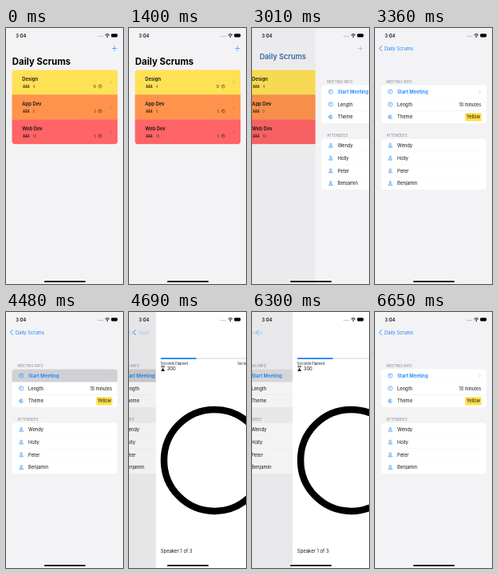
An HTML page with a canvas that plays this animation: 147 by 320 pixels, repeating every 6720 ms.

```html
<!DOCTYPE html>
<html lang="en">
<head>
<meta charset="utf-8">
<title>Daily Scrums</title>
<style>
html, body { margin: 0; width: 100%; height: 100%; overflow: hidden; background: #f3f3f6; }
canvas { display: block; width: 100vw; height: 100vh; }
</style>
</head>
<body>
<canvas id="stage"></canvas>
<script>
const W = 147, H = 320, LOOP = 6720, STEP = 70;
const BLUE = '#1483fa', BACKDROP = '#f3f3f6', INK = '#000', BODY = '#161616';
const canvas = document.getElementById('stage');
const ctx = canvas.getContext('2d');

const clamp = v => Math.max(0, Math.min(1, v));
const mix = (a, b, p) => a + (b - a) * p;

// Critically damped navigation spring, 0 to 1.
function spring(ms) {
  const x = 18 * Math.max(0, ms) / 1000;
  const p = 1 - (1 + x) * Math.exp(-x);
  return p > 0.995 ? 1 : p;
}

function layer(alpha, dx, draw) {
  if (alpha <= 0) return;
  ctx.save();
  ctx.globalAlpha *= alpha;
  ctx.translate(dx, 0);
  draw();
  ctx.restore();
}

function rect(x, y, w, h, color, r = 0) {
  ctx.fillStyle = color;
  ctx.beginPath();
  ctx.roundRect(x, y, w, h, r);
  ctx.fill();
}

function text(str, x, y, size, color = BODY, weight = 400, align = 'left') {
  ctx.font = `${weight} ${size}px Inter, "Open Sans", sans-serif`;
  ctx.textAlign = align;
  ctx.fillStyle = color;
  ctx.fillText(str, x, y);
}

function line(points, color, width) {
  ctx.strokeStyle = color;
  ctx.lineWidth = width;
  ctx.lineCap = ctx.lineJoin = 'round';
  ctx.beginPath();
  points.forEach(([x, y]) => ctx.lineTo(x, y));
  ctx.stroke();
}

function ring(x, y, r, color, width, from = 0, to = Math.PI * 2) {
  ctx.strokeStyle = color;
  ctx.lineWidth = width;
  ctx.lineCap = 'butt';
  ctx.beginPath();
  ctx.arc(x, y, r, from, to);
  ctx.stroke();
}

function shape(points, color) {
  ctx.fillStyle = color;
  ctx.beginPath();
  points.forEach(([x, y]) => ctx.lineTo(x, y));
  ctx.fill();
}

function dot(x, y, r, color) {
  ctx.fillStyle = color;
  ctx.beginPath();
  ctx.arc(x, y, r, 0, Math.PI * 2);
  ctx.fill();
}

const disclosure = (y, color) => line([[130.8, y - 1.9], [132.6, y], [130.8, y + 1.9]], color, 0.6);

function clock(x, y, r, color) {
  ring(x, y, r, color, 0.6);
  line([[x, y - r * 0.65], [x, y], [x - r * 0.5, y]], color, 0.5);
}

function person(x, y) {
  ring(x, y - 1.4, 1.2, BLUE, 0.6);
  ring(x, y + 2.4, 2.1, BLUE, 0.6, Math.PI, 0);
  line([[x - 2.1, y + 2.4], [x + 2.1, y + 2.4]], BLUE, 0.6);
}

function crowd(x, y, color) {
  for (const dx of [-2.8, 0, 2.8]) {
    dot(x + dx, y - 1.1, 0.95, color);
    rect(x + dx - 1.5, y + 0.2, 3, 1.5, color, [1.2, 1.2, 0, 0]);
  }
}

function palette(x, y) {
  ring(x, y, 2.3, BLUE, 0.7, 0.4, 5.6);
  line([[x - 2, y - 0.4], [x + 0.8, y - 0.6], [x + 2, y + 0.9]], BLUE, 0.7);
  dot(x - 0.3, y + 0.9, 0.6, BLUE);
}

function hourglass(x, y, sandLow) {
  const top = y - 2.8, end = y + 2.8;
  rect(x - 2.2, top - 0.3, 4.4, 0.8, INK);
  rect(x - 2.2, end - 0.5, 4.4, 0.8, INK);
  for (const side of [-1, 1]) {
    line([[x + 1.5 * side, top], [x + 1.3 * side, y - 1.2], [x, y],
      [x + 1.3 * side, y + 1.2], [x + 1.5 * side, end]], INK, 0.5);
  }
  const edge = sandLow ? end : top;
  shape([[x - 1.6, edge], [x, y], [x + 1.6, edge]], INK);
}

const scrums = [
  ['Design', '4', '10', '#ffe156'],
  ['App Dev', '5', '5', '#ff934c'],
  ['Web Dev', '10', '5', '#ff6466'],
];

function listPage() {
  const top = 52.3, row = 31, soft = 'rgba(0,0,0,.66)';
  rect(0, 0, W, H, BACKDROP);
  ctx.save();
  ctx.beginPath();
  ctx.roundRect(7.5, top, 132.7, row * 3, 4);
  ctx.clip();
  scrums.forEach(([name, people, minutes, color], i) => {
    const y = top + row * i;
    rect(7, y, 134, row + 0.2, color);
    text(name, 20.3, y + 13.5, 5.9, BODY, 600);
    crowd(25.4, y + 20.6, soft);
    text(people, 33.7, y + 22.2, 4.2, soft);
    text(minutes, 113.5, y + 22.2, 4.2, soft, 400, 'right');
    clock(118.4, y + 20.6, 2, soft);
    disclosure(y + 15.5, 'rgba(60,60,67,.36)');
  });
  ctx.restore();
}

const attendees = ['Wendy', 'Holly', 'Peter', 'Benjamin'];

function detailPage(highlight) {
  const row = 15.8, label = '#8a8a8f', rule = '#ececee';
  rect(0, 0, W, H, BACKDROP);

  text('MEETING INFO', 14.5, 68.8, 4.5, label);
  rect(7.5, 71.6, 132.5, row * 3, '#fff', 3.6);
  for (const i of [1, 2]) rect(28, 71.5 + row * i, 112, 0.3, rule);
  layer(highlight, 0, () => rect(7.5, 71.6, 132.5, row, '#d1d1d5', [3.6, 3.6, 0, 0]));
  clock(19.2, 79.6, 2.6, BLUE);
  text('Start Meeting', 28, 81.8, 5.9, BLUE, 600);
  disclosure(79.6, '#b9b9be');
  clock(19.2, 95.4, 2.6, BLUE);
  text('Length', 28, 97.6, 5.8);
  text('10 minutes', 133.2, 97.6, 5.5, BODY, 400, 'right');
  palette(19.2, 111.2);
  text('Theme', 28, 113.4, 5.8);
  rect(113.4, 106.3, 20.2, 10.2, '#ffdf4d', 1.2);
  text('Yellow', 123.5, 113.4, 5.6, BODY, 400, 'center');

  text('ATTENDEES', 14.5, 135.6, 4.5, label);
  rect(7.5, 138.7, 132.5, row * 4, '#fff', 3.6);
  attendees.forEach((name, i) => {
    const y = 146.8 + row * i;
    if (i) rect(28, 138.6 + row * i, 112, 0.3, rule);
    person(19.2, y);
    text(name, 28, y + 2.2, 5.8);
  });
}

function meetingPage() {
  rect(0, 0, W, H, '#fff');
  rect(6, 57.3, 135, 1.6, '#e5e5ea', 0.8);
  rect(6, 57.3, 45, 1.6, BLUE, 0.8);
  text('Seconds Elapsed', 6, 65.8, 4.2);
  text('Seconds Remaining', 141.5, 65.8, 4.2, BODY, 400, 'right');
  hourglass(8.8, 70.6, true);
  text('300', 14, 72.8, 5.8);
  hourglass(125.2, 70.6, false);
  text('600', 141.5, 72.8, 5.8, BODY, 400, 'right');
  ring(73.7, 185.4, 63.5, INK, 8.5);
  text('Speaker 1 of 3', 6, 301, 5.9);
  for (const x of [133, 137.2]) shape([[x, 296.2], [x + 4.6, 298.8], [x, 301.4]], BLUE);
}

// Slides `upper` over `lower`; q = 1 means the upper page covers the stage.
function stack(lower, upper, q) {
  if (q < 1) layer(1, -0.3 * W * q, lower);
  if (q > 0 && q < 1) rect(0, 0, W, H, `rgba(0,0,0,${0.07 * q})`);
  if (q > 0) layer(1, W * (1 - q), upper);
}

function statusBar() {
  text('3:04', 12.3, 11.6, 5.7, BODY, 600);
  for (let i = 0; i < 4; i++) dot(115.8 + 1.9 * i, 10.2, 0.5, '#777');
  for (const r of [4, 2.5]) ring(127.3, 11.5, r, INK, 0.8, -Math.PI * 0.75, -Math.PI * 0.25);
  dot(127.3, 11.1, 0.8, INK);
  rect(132.2, 7.3, 7.8, 4.1, INK, 1.1);
  rect(140.4, 8.6, 0.5, 1.5, '#777', 0.2);
  rect(48, 316, 52, 1.8, INK, 0.9);
}

function navBar(push, meeting, pressed) {
  layer(1 - push, 0, () => {
    line([[133.2, 25.5], [139.2, 25.5]], BLUE, 0.6);
    line([[136.2, 22.5], [136.2, 28.5]], BLUE, 0.6);
  });

  // The large title shrinks into the back label, fading from black to blue.
  const shrink = push ** 1.2;
  const title = color => text('Daily Scrums', mix(7.8, 12, shrink), mix(46.2, 27.6, shrink),
    mix(11.4, 5.8, shrink), color, Math.round(mix(700, 400, push)));
  layer(1 - push, 0, () => title(INK));
  layer(push * (1 - meeting), -53 * meeting, () => title(BLUE));

  layer(clamp(3 * push - 2) * pressed, 0, () =>
    line([[8.4, 22.4], [5.4, 25.5], [8.4, 28.6]], BLUE, 0.9));
  layer(clamp(3 * meeting - 2) * pressed, 0, () => text('Back', 12, 27.6, 5.8, BLUE));
}

function render(t) {
  const push = spring(t - 2924);
  const leaving = t >= 6160;
  const pop = spring(t - 6232);
  const meeting = leaving ? 1 - pop : spring(t - 4534);
  const highlight = leaving ? 1 - pop : t >= 4480 ? 1 : 0;
  const detail = () => detailPage(highlight);

  if (push < 1) stack(listPage, detail, push);
  else stack(detail, meetingPage, meeting);
  navBar(push, meeting, leaving ? mix(0.35, 1, pop) : 1);
  statusBar();
}

function frame(now) {
  const dpr = window.devicePixelRatio || 1;
  const w = Math.round(innerWidth * dpr), h = Math.round(innerHeight * dpr);
  if (canvas.width !== w || canvas.height !== h) {
    canvas.width = w;
    canvas.height = h;
  }
  ctx.setTransform(w / W, 0, 0, h / H, 0, 0);
  render(Math.floor((now % LOOP) / STEP) * STEP);
  requestAnimationFrame(frame);
}
frame(performance.now());
</script>
</body>
</html>
```
